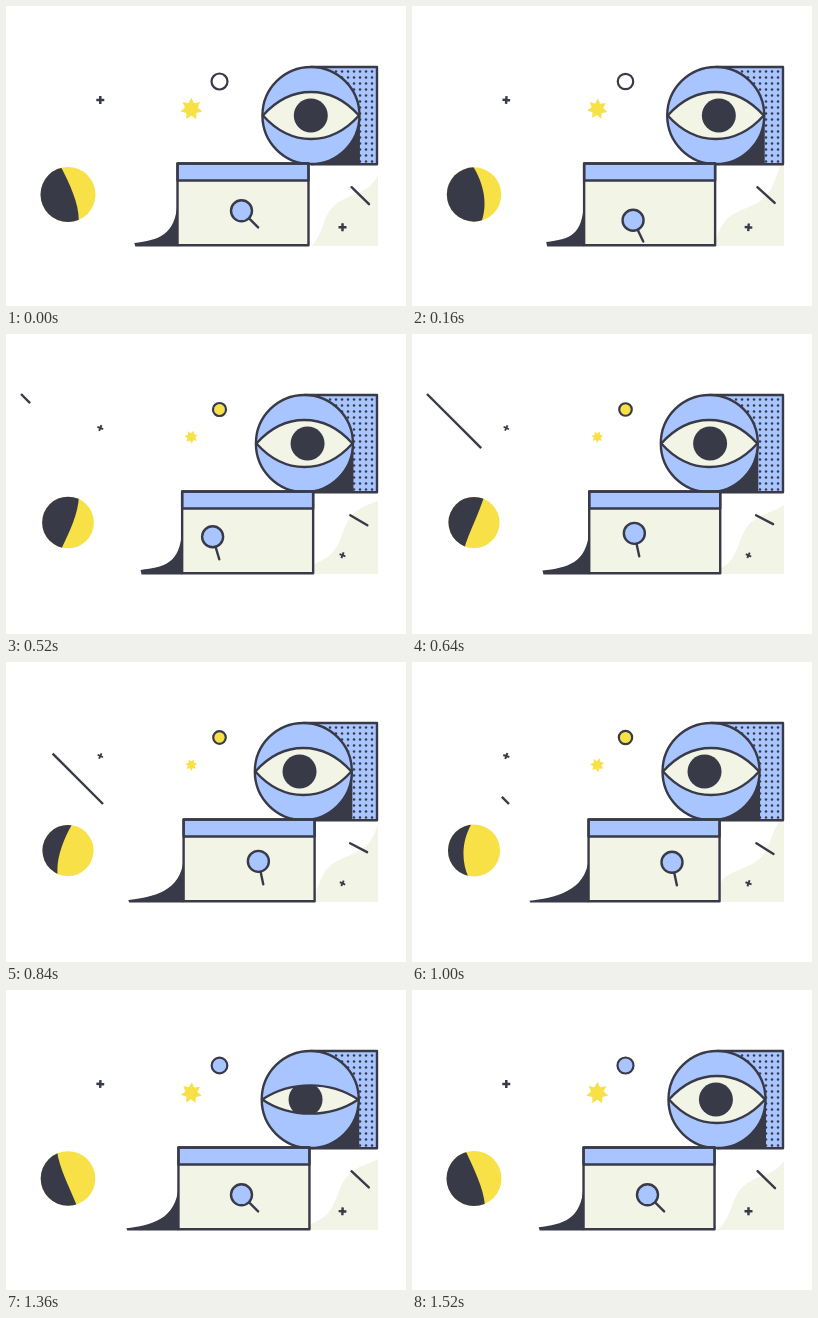
Recreate the animation shown at these times as an HTML page with a canvas. Size 400 by 300 pixels, loop 1560 ms.

```html
<!DOCTYPE html>
<html lang="en">
<head>
<meta charset="utf-8">
<style>
  html, body { margin: 0; width: 100%; height: 100%; overflow: hidden; background: #fff; }
  canvas { display: block; }
</style>
</head>
<body>
<canvas id="stage" width="400" height="300"></canvas>
<script>
const ctx = document.getElementById('stage').getContext('2d');
const LOOP = 1560, STEP = 40;
const DARK = '#393a48', BLUE = '#a8c5ff', YELLOW = '#f8e047', CREAM = '#f2f4e6';

const rad = deg => deg * Math.PI / 180;
// Cosine that peaks when the loop has turned by `peak` degrees
const swing = (t, peak, turns = 1) => Math.cos(rad(360 * turns * t / LOOP - peak));
const ramp = (t, from, to) => Math.max(0, Math.min(1, (t - from) / (to - from)));
const ease = u => u < .5 ? 2 * u * u : 1 - 2 * (1 - u) ** 2;
const move = (t, from, to) => ease(ramp(t, from, to));

function paint(path, fill, stroke, width = 2.4) {
  const p = typeof path === 'string' ? new Path2D(path) : path;
  if (fill) { ctx.fillStyle = fill; ctx.fill(p); }
  if (stroke) { ctx.strokeStyle = stroke; ctx.lineWidth = width; ctx.stroke(p); }
}
function circle(x, y, r) {
  const p = new Path2D();
  p.arc(x, y, r, 0, 2 * Math.PI);
  return p;
}
const disc = (x, y, r, ...style) => paint(circle(x, y, r), ...style);
const line = (x1, y1, x2, y2, width) => paint(`M${x1} ${y1}L${x2} ${y2}`, null, DARK, width);
function clipped(path, draw) {
  ctx.save();
  ctx.clip(path);
  draw();
  ctx.restore();
}

function plus(x, y, p) {
  ctx.save();
  ctx.translate(x, y);
  ctx.rotate(p * .45);
  ctx.scale(1 - .27 * p, 1 - .27 * p);
  paint('M-4 0H4M0-4V4', null, DARK, 2.5);
  ctx.restore();
}

function star(p) {
  const path = new Path2D(), points = 7, size = 11.3 - 5.5 * p;
  for (let i = 0; i < points * 2; i++) {
    const r = i % 2 ? size * .57 : size;
    const a = i * Math.PI / points - Math.PI / 2 + p * .45;
    path.lineTo(185.3 + r * Math.cos(a), 103 + r * Math.sin(a));
  }
  path.closePath();
  paint(path, YELLOW);
}

function ring(t, p) {
  const x = 213.5, y = 75.5, r = 8 - 1.8 * p;
  disc(x, y, r * ramp(t, 325, 560), YELLOW);
  disc(x, y, r * ramp(t, 1060, 1260), BLUE);
  disc(x, y, r, null, DARK, 2.2);
}

// The shadow edge is a wave that travels down the globe
function moon(t, p) {
  const globe = circle(62, 188.5, 27.5 - 2 * p);
  const edge = (i, size) => 62 + size * swing(t, 130 - 47 * i);
  paint(globe, YELLOW);
  clipped(globe, () => paint(
    `M30 161H${edge(0, 11)}C${edge(1, 14)} 178 ${edge(2, 14)} 198 ${edge(3, 11)} 216H30Z`, DARK));
}

function eye(t, p) {
  const x = 305 - 8 * p, y = 109.5;
  paint('M305 61H371V158.3H305Z', BLUE);
  for (let dx = 366; dx > 308; dx -= 6)
    for (let dy = 65.5; dy < 156; dy += 6) disc(dx, dy, 1.25, DARK);
  paint(`M${x} ${y}h49V158.3h-49Z`, DARK);
  paint(`M${x} 61H371V158.3H${x}`, null, DARK);
  disc(x, y, 48.5, BLUE, DARK);

  const shut = move(t, 1120, 1285) - move(t, 1285, 1430);
  const lid = 31.3 * (1 - .85 * shut);
  const almond = new Path2D(`M${x - 48} ${y}c28 ${-lid} 68 ${-lid} 96 0c-28 ${lid}-68 ${lid}-96 0Z`);
  paint(almond, CREAM);
  clipped(almond, () => disc(299.7 + 7.2 * swing(t, 45), y, 17, DARK));
  paint(almond, null, DARK);
}

// Diagonal slope with a ripple running along it, twice per loop
function hill(t) {
  const path = new Path2D();
  for (let s = -.2; s < 1.2; s += .04) {
    const lift = 6 * swing(t, 115 + 410 * s, 2);
    path.lineTo(372 - 68 * s - .72 * lift, 163 + 70 * s - .7 * lift);
  }
  path.lineTo(290, 260);
  path.lineTo(390, 260);
  clipped(new Path2D('M300 158H372V240H300Z'), () => paint(path, CREAM));
}

function wave(t, x) {
  const s = swing(t, 80), tip = 126.5 + 10.5 * s, y = 237.3 - 1.8 * s;
  paint(`M${tip} ${y}C${tip + 24} ${y - 3} ${x - 2} 230 ${x} 196V240.5H${tip + 1}Z`, DARK);
}

function panel(x) {
  const box = `M${x} 157.5h131V239.3h-131Z`;
  paint(box, CREAM);
  paint(`M${x} 157.5h131V174.5h-131Z`, BLUE, DARK);
  paint(box, null, DARK);
}

// Dips left, sweeps right, then settles back
function magnifier(t) {
  const left = move(t, 0, 360), right = move(t, 360, 1000), back = move(t, 1000, 1300);
  const x = 235.5 - 36.5 * left + 61 * right - 24.5 * back;
  const y = 204.8 + 10 * Math.sin(Math.PI * left) - 4 * Math.sin(Math.PI * right) - 4.5 * (right - back);
  const a = rad(45 + 21 * move(t, 0, 200) + 12 * move(t, 360, 640) - 33 * back);
  const c = Math.cos(a), s = Math.sin(a);
  line(x + 10 * c, y + 10 * s, x + 23.5 * c, y + 23.5 * s);
  disc(x, y, 10.5, BLUE, DARK);
}

function streak(t) {
  const head = 82 * move(t, 440, 780), tail = 82 * move(t, 640, 1095);
  if (head > tail) line(15 + tail, 60 + tail, 15 + head, 60 + head, 2.4);
}

function draw(t) {
  const p = (1 - swing(t, -10)) / 2;
  const x = 174.6 - 3.1 * swing(t, 0);
  ctx.fillStyle = '#fff';
  ctx.fillRect(0, 0, 400, 300);
  ctx.lineJoin = 'round';
  ctx.lineCap = 'round';
  hill(t);
  line(345.6 - 1.6 * p, 181.2, 363 - 2 * p, 198.2 - 8.4 * p);
  ctx.lineCap = 'butt';
  plus(94.3, 94, p);
  plus(336.5, 221.3, p);
  star(p);
  ring(t, p);
  moon(t, p);
  streak(t);
  eye(t, p);
  wave(t, x);
  panel(x);
  ctx.lineCap = 'round';
  magnifier(t);
}

const start = performance.now();
function frame() {
  const t = (performance.now() - start) % LOOP;
  draw(Math.floor(t / STEP) * STEP);
  requestAnimationFrame(frame);
}
frame();
</script>
</body>
</html>
```
